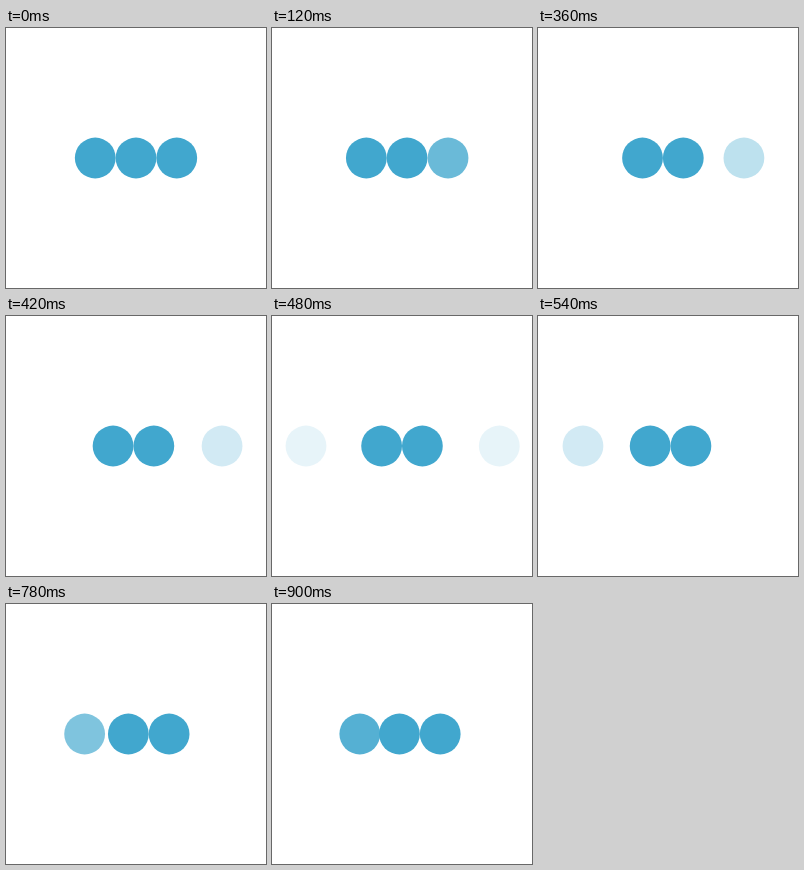
An HTML page for the animation above (960 ms loop, 260 by 260 pixels).

```html
<!DOCTYPE html>
<html lang="en">
<head>
<meta charset="utf-8">
<title>Loading dots</title>
<style>
  html, body { margin: 0; width: 100%; height: 100%; overflow: hidden; background: #fff; }
  svg { display: block; width: 100vw; height: 100vh; }
  circle { fill: #41a7ce; }
</style>
</head>
<body>
<svg viewBox="0 0 260 260">
  <circle id="enter" cy="130" r="20.4"/>
  <circle id="first" cy="130" r="20.4"/>
  <circle id="second" cy="130" r="20.4"/>
  <circle id="exit" cy="130" r="20.4"/>
</svg>
<script>
  const LOOP = 960, STEP = 60, HALF = LOOP / 2;
  const PITCH = 40.75, LEFT = 89.25, MID = LEFT + PITCH, RIGHT = MID + PITCH;
  const FAR_LEFT = 34, FAR_RIGHT = 227.3, FAINT = 0.125;

  const [enter, first, second, exit] =
    ['enter', 'first', 'second', 'exit'].map(id => document.getElementById(id));
  const mix = (a, b, p) => a + (b - a) * p;

  // cubic-bezier(.42, 0, 1, 1), solved by bisection
  function easeIn(p) {
    let lo = 0, hi = 1;
    for (let i = 0; i < 24; i++) {
      const s = (lo + hi) / 2;
      const x = 1.26 * s + 0.48 * s * s - 0.74 * s * s * s;
      if (x < p) lo = s; else hi = s;
    }
    return lo * lo * (3 - 2 * lo);
  }

  function place(dot, x, alpha = 1) {
    dot.setAttribute('cx', x.toFixed(2));
    dot.setAttribute('opacity', alpha.toFixed(3));
  }

  function draw(now) {
    const t = Math.floor((now % LOOP) / STEP) * STEP;
    const shift = PITCH * t / LOOP;
    place(first, LEFT + shift);
    place(second, MID + shift);

    // The last dot leaves in the first half, a new one arrives in the second.
    const out = Math.min(t / HALF, 1);
    const back = Math.max(t / HALF - 1, 0);
    place(exit, mix(RIGHT, FAR_RIGHT, easeIn(out)), t <= HALF ? mix(1, FAINT, out) : 0);
    place(enter, mix(LEFT, FAR_LEFT, easeIn(1 - back)), t >= HALF ? mix(FAINT, 1, back) : 0);
  }

  let start;
  function tick(now) {
    start ??= now;
    draw(Math.max(0, now - start));
    requestAnimationFrame(tick);
  }
  draw(0);
  requestAnimationFrame(tick);
</script>
</body>
</html>
```
